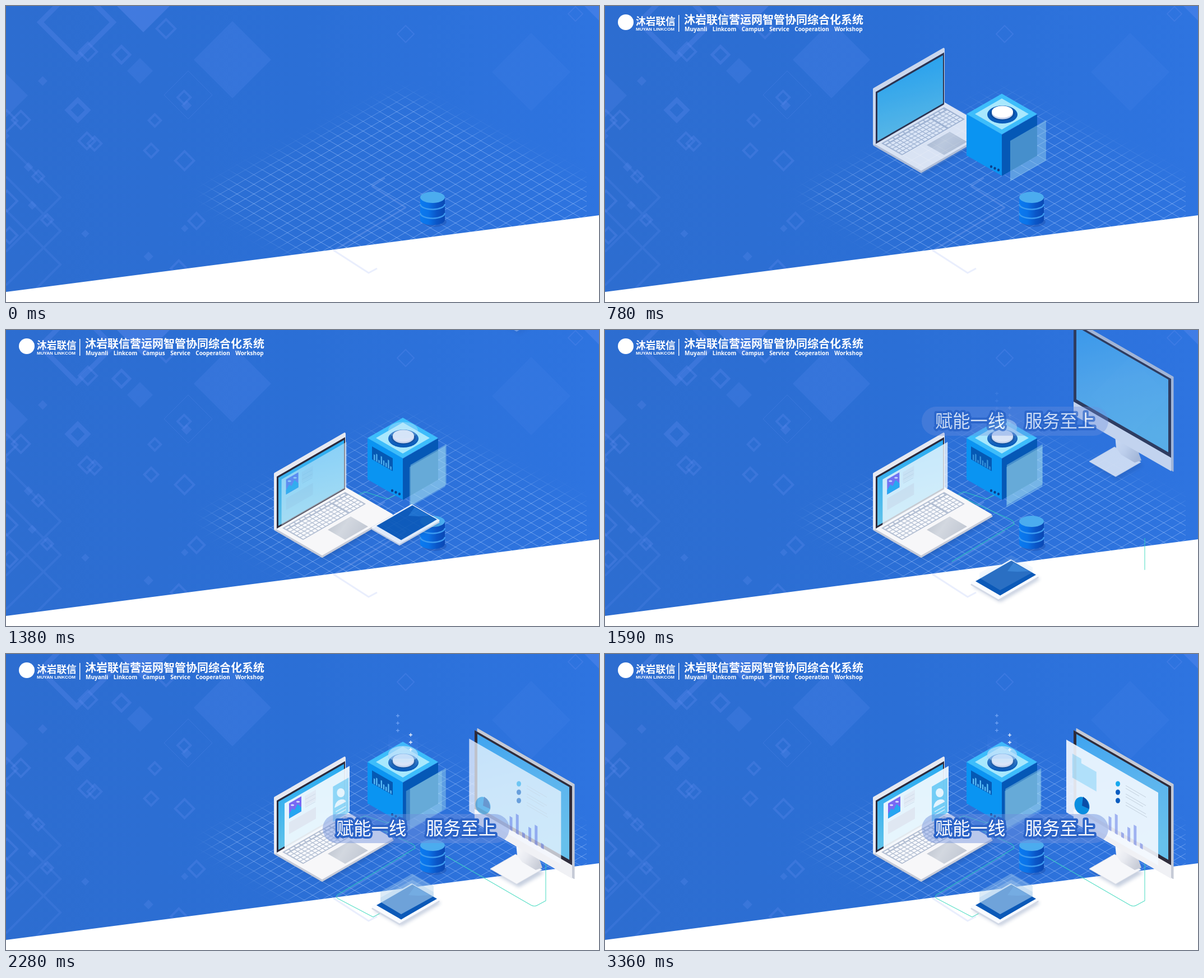
Write an HTML page that moves like this. It is 1058x529 px and loops after 3.39 s.

```html
<!DOCTYPE html>
<html lang="zh">
<head>
<meta charset="utf-8">
<title>Isometric banner</title>
<style>
html, body { margin: 0; width: 100%; height: 100%; overflow: hidden; background: #fff; }
svg { display: block; width: 100%; height: 100%; }
.cjk { font-family: "Noto Sans CJK SC", "Noto Sans CJK", sans-serif; }
.wide { font: 700 8.1px "Liberation Sans", sans-serif; }
.lat { font: 700 10px "Open Sans", sans-serif; word-spacing: 6.8px; }
</style>
</head>
<body>
<svg id="stage" viewBox="0 0 1058 529" xmlns="http://www.w3.org/2000/svg"></svg>
<script>
const LOOP = 3390, BEAT = 1050, K = 0.577; // K: slope of the isometric axes
const stage = document.getElementById('stage');
const range = (n, f) => Array.from({ length: n }, (_, i) => f(i)).join('');

let seed = 11;
const rnd = () => (seed = (seed * 16807) % 2147483647) / 2147483647;

// Markup helpers
const poly = (pts, fill, more = '') => `<polygon points="${pts}" fill="${fill}" ${more}/>`;
const line = (d, stroke, w, more = '') => `<path d="${d}" fill="none" stroke="${stroke}" stroke-width="${w}" ${more}/>`;
const oval = (x, y, rx, ry, fill, more = '') => `<ellipse cx="${x}" cy="${y}" rx="${rx}" ry="${ry}" fill="${fill}" ${more}/>`;
const group = (id, body, more = '') => `<g id="${id}" ${more}>${body}</g>`;
const diamond = (x, y, r) => `${x},${y - r} ${x + r},${y} ${x},${y + r} ${x - r},${y}`;
const round = (color, w) => `stroke="${color}" stroke-width="${w}" stroke-linejoin="round"`;
const fade = (id, x2, y2, ...stops) => `<linearGradient id="${id}" x1="0" y1="0" x2="${x2}" y2="${y2}">` +
  stops.map(([c, o = 1], i) => `<stop offset="${i / (stops.length - 1)}" stop-color="${c}" stop-opacity="${o}"/>`).join('') +
  '</linearGradient>';

// Upright face from its top left corner; dir 1 runs down to the right, -1 up
const wall = (x, y, w, h, dir) =>
  `${x},${y} ${x + w},${y + dir * w * K} ${x + w},${y + dir * w * K + h} ${x},${y + h}`;
// Flat face from its left corner: a to the upper right, b to the lower right
const floor = (x, y, a, b) =>
  `${x},${y} ${x + a},${y - a * K} ${x + a + b},${y + (b - a) * K} ${x + b},${y + b * K}`;
const shadow = pts => poly(pts, '#1d3f80', 'opacity=".25" filter="url(#blur)"');

const LAND = '0,0 1058,0 1058,374 0,511';
const defs = `<defs>
${fade('sky', 1, 0, ['#2d6dd0'], ['#2b6fd6'], ['#2e74e0'])}
${fade('lcd', 0.2, 1, ['#1fa6f4'], ['#3fb4ee'], ['#62c4ea'])}
${fade('desk', 0.2, 1, ['#3fa4f0'], ['#5cb4ee'], ['#66c0ec'])}
${fade('metal', 1, 0.4, ['#b9c0cc'], ['#d3d8e0'], ['#c3c9d4'])}
${fade('drum', 1, 0, ['#0a7af0'], ['#0a72e8'], ['#0a56c8'], ['#0a48b4'])}
${fade('neck', 1, 0.6, ['#fafbfd'], ['#e9ebf1'], ['#c9cdd8'])}
${fade('beamFill', 0, 1, ['#4a7ff0', 0], ['#6aa4ff', 0.5])}
${fade('domeFill', 0, 1, ['#c4e4fa', 0.5], ['#c4e4fa', 0.25], ['#c4e4fa', 0])}
<filter id="soft"><feGaussianBlur stdDeviation="16"/></filter>
<filter id="blur"><feGaussianBlur stdDeviation="3"/></filter>
<mask id="spot" maskUnits="userSpaceOnUse" x="0" y="0" width="1036" height="529">
${poly('710,158 350,338 560,470 760,560 1100,350', '#fff', 'filter="url(#soft)"')}</mask>
<clipPath id="land">${poly(LAND, '#000')}</clipPath>
</defs>`;

// Backdrop: large diamonds, a seeded scatter of small ones, a fading grid
const TINT = '#628cf0';
const solid = (x, y, r, o) => poly(diamond(x, y, r), TINT, `opacity="${o}"`);
const frame = (x, y, r, w) => poly(diamond(x, y, r), 'none', `stroke="${TINT}" stroke-opacity=".28" stroke-width="${w}"`);
const large = solid(404, 96, 69, 0.2) + solid(937, 118, 70, 0.09) + solid(245, -8, 55, 0.4) + solid(0, 160, 39, 0.2) +
  solid(1070, -12, 50, 0.35) + solid(239, 116, 23, 0.2) + frame(126, 29, 65, 9) + frame(325, 159, 43, 1) +
  frame(206, 87, 15, 5) + frame(128, 186, 18, 8) + frame(713, 50, 15, 2) + frame(1016, 14, 13, 2);
const small = range(24, i => {
  const x = 340 * rnd() ** 1.3, y = 40 + 430 * rnd();
  return i % 3 ? frame(x, y, 10 + 10 * rnd(), 4) : solid(x, y, 5 + 5 * rnd(), 0.25);
});
const weave = line(range(3, i => `M0 ${245 + i * 60}l97 97l-97 97`), TINT, 4, 'opacity=".2"');
const mesh = range(90, i => {
  const y = 163 + (i - 45) * 17.3;
  return `M0 ${y - 712 * K}l1058 ${1058 * K}M0 ${y + 712 * K}l1058 ${-1058 * K}`;
});
const backdrop = `<rect width="1058" height="529" fill="#fff"/>${poly(LAND, 'url(#sky)')}
<g clip-path="url(#land)">${large}${small}${weave}<g mask="url(#spot)">${line(mesh, '#a9cbff', 1, 'opacity=".5"')}</g></g>
${line('M676 307L653 322L713 360L585 437L647 477L662 469', '#a9bdf6', 3, 'opacity=".25" stroke-linejoin="round"')}`;

const drum = oval(764, 386, 22, 9, '#1c4ca8', 'opacity=".4"') +
  `<path d="M739 342v40a22 9.5 0 0 0 44 0v-40z" fill="url(#drum)"/>` +
  line('M739 354a22 9.5 0 0 0 44 0m-44 16a22 9.5 0 0 0 44 0', '#3d9af0', 2.5) + oval(761, 342, 22, 10, '#4bacef');

const wires = `<g fill="none" stroke="#30d8ba" stroke-width="1.1" stroke-linejoin="round">
<path id="wireA" pathLength="100" d="M706 290L680 302L640 289L628 295L724 339Q730 342 730 347L592 430Q587 434 592 437L655 470L670 462"/>
<path id="wireB" pathLength="100" d="M963 372V441L948 449Q943 452 937 449L785 361"/></g>`;

// Laptop
const keys = range(80, i => {
  const c = i % 16, r = (i - c) / 16;
  return `M${2 + c * 6.7 + (c > 11 ? 2 : 0)} ${7.5 + r * 5.8}h5.4v4.5h-5.4z`;
}) + range(12, c => `M${2 + c * 9} 2h7v3h-7z`);
const photo = poly(wall(505, 267, 22, 27, -1), '#7f62f4') +
  poly('505,294 505,286 511,276 515,279 520,268 527,274 527,281', '#22a4f2') +
  oval(511, 270, 3, 1.5, '#e8e4ff') + oval(521, 264, 3, 1.5, '#e8e4ff');
const lapSheet = group('lapSheet', poly(wall(497, 267, 116, 82, -1), '#f3faff') + photo +
  poly(wall(533, 254, 20, 19, -1), '#ece9f2', 'opacity=".7"') + poly(wall(505, 301, 48, 21, -1), '#ecebf3') +
  line(range(3, i => `M534 ${260 + i * 7}l18 -10`), '#dcdfea', 1));
const card = group('card', poly(wall(585, 237, 28, 63, -1), '#2ab4f2') +
  oval(599, 248, 7, 8, '#e4f5ff') + `<path d="M588 273q2-11 11-13q8-1 9 4l-20 11z" fill="#e4f5ff"/>` +
  line('M590 282l18 -10m-18 16l18 -10', '#bfe8fc', 1.5));
const laptop = group('laptop', shadow(floor(484, 360, 126, 85)) +
  poly(floor(480, 357, 126, 84), '#c6cbd8', round('#c6cbd8', 3)) + poly(floor(480, 354, 126, 84), '#f7f7f9', round('#f7f7f9', 1)) +
  poly(wall(480, 257, 124, 98, -1), '#e6e9f1', round('#e6e9f1', 4)) + poly(wall(483, 262, 122, 93, -1), '#2b2a3c') +
  poly(wall(486, 264, 117, 86, -1), 'url(#lcd)') +
  `<g transform="matrix(1 ${-K} 1 ${K} 493 354)"><rect width="112" height="37" fill="#b3bfd3"/><path d="${keys}" fill="#f8f9fc"/></g>` +
  poly(floor(574, 357, 41, 31), 'url(#metal)') + lapSheet + card);

// Cube
const chart = group('chart', poly(wall(653, 208, 37, 23, 1), '#0559b4') +
  group('chartBars', range(8, i => {
    const h = 10 + 5 * Math.sin(i * 2.4);
    return poly(wall(656 + i * 4.2, 232 + i * 2.4 - h, 2.4, h, 1), '#5cc0fa');
  })));
const pane = id => poly(wall(0, 37, 64, 72, -1), '#a8e2ee', `id="${id}"`);
const plus = x => range(3, i => `M${x - 3} ${i * 13.2}h6m-3 -3v6`);
const cube = group('cube', poly(wall(645, 193, 63, 74, 1), '#0a94f2') + poly(wall(708, 230, 63, 74, -1), '#0558b6') +
  poly(floor(645, 193, 63, 63), '#3dbdfb') + poly(floor(660, 193, 48, 48), '#a8e8fd') +
  oval(709, 194, 27, 16, '#0a5cba') + oval(709, 192, 22, 12.5, '#0a4c9e') +
  oval(709, 191.5, 19, 11, '#c6d2ec') + oval(709, 189, 19, 10.5, '#fff', 'id="knob"') +
  range(3, i => oval(689 + i * 6.5, 287 + i * 3, 2.2, 2.6, '#0b3f8c')) + chart) + pane('paneA') + pane('paneB') +
  '<rect id="beam" x="682" y="142" width="53" height="45" fill="url(#beamFill)"/>' +
  group('dome', '<path id="domeWall" fill="url(#domeFill)"/>' + oval(708.5, 0, 26.5, 15, '#c4e4fa', 'id="domeTop" opacity=".4"')) +
  line(plus(699), '#8fb8ff', 1.2, 'id="plusL"') + line(plus(722), '#fff', 1.4, 'id="plusR"');

// Tablet
const tablet = group('tablet', shadow(floor(656, 458, 71, 49)) +
  poly(floor(654, 455, 70, 48), '#d3d9e6', round('#d3d9e6', 3)) + poly(floor(654, 452, 70, 48), '#f9fbff', round('#f9fbff', 3)) +
  poly(floor(661, 449, 64, 44), '#0b59b8') + poly('718,431 729,416 756,431 736,432', '#2a84e0', 'opacity=".6"') +
  poly('', '#a9cdec', 'id="glowA"') + poly('', '#a9cdec', 'id="glowB"'));

// Desktop screen
const bars = range(6, i => {
  const h = 23 + 15 * Math.sin(2.1 * i + 0.1);
  return poly(wall(898.5 + i * 11.2, 314 + i * 6.5 - h, 5, h, 1), '#3c58e2');
});
const notes = range(3, i => oval(915, 232 + i * 15, 4, 4.8, i ? '#0a5cc0' : '#17a8ee') +
  line(`M929 ${235 + i * 15}l36 21m-36 -16l${24 + i * 7} ${14 + i * 4}`, '#c3d0dd', 1));
const pie = oval(851, 271, 13, 16, '#0b8ee0', 'transform="rotate(-20 851 271)"') +
  '<path d="M851 271L853 255Q863 261 864 277z" fill="#0a4ea8"/>';
const monitor = group('monitor', shadow(floor(868, 390, 45, 47)) +
  poly(floor(864, 384, 45, 47), '#f6f7fa', round('#dfe2ea', 1)) +
  poly('910,338 950,362 957,382 945,386 921,372 912,360', 'url(#neck)') +
  poly(wall(841, 133, 173, 169, 1), '#c5cad6', round('#c5cad6', 1)) + poly(wall(836, 136, 174, 165, 1), '#f0f1f5') +
  poly(wall(836, 136, 174, 141, 1), '#2f2c3b') + poly(wall(841, 143, 164, 130, 1), 'url(#desk)') +
  poly(wall(823, 153, 164, 130, 1), '#f4f9ff', 'id="deskGlass"') + group('deskInfo', notes + pie) + group('deskBars', bars) +
  group('folder', poly(wall(823, 178, 16, 30, 1), '#22b2f3') + poly(wall(823, 186, 43, 35, 1), '#22b2f3')));

const slogan = group('slogan', `<rect x="565" y="286" width="333" height="52" rx="26" fill="#6d8fdd" opacity=".46"/>
<g class="cjk" font-size="31.3" font-weight="500" fill="#fff" ${round('#2c64c8', 8)} paint-order="stroke">
<text x="589" y="323">赋能一线</text><text x="749" y="323">服务至上</text></g>`);

const header = group('header', `<circle cx="37" cy="29" r="14"/>
<g class="cjk" font-weight="700"><text x="55" y="34" font-size="17.7">沐岩联信</text>
<text x="141" y="32" font-size="20">沐岩联信营运网智管协同综合化系统</text></g>
<text class="wide" x="55" y="44">MUYAN LINKCOM</text><rect x="131" y="16" width="1.4" height="30"/>
<text class="lat" x="142" y="45">Muyanli Linkcom Campus Service Cooperation Workshop</text>`, 'fill="#fff"');

stage.innerHTML = defs + backdrop + drum + wires + laptop + cube + tablet + monitor + slogan + header;

// Motion
const parts = {};
stage.querySelectorAll('[id]').forEach(n => { parts[n.id] = n; });
const set = (id, attrs) => { for (const a in attrs) parts[id].setAttribute(a, attrs[a]); };
const shift = (id, x, y, opacity) => set(id, { transform: `translate(${x} ${y})`, opacity });
const clamp = v => Math.min(1, Math.max(0, v));
const ramp = (t, a, b) => { const p = clamp((t - a) / (b - a)); return p * p * (3 - 2 * p); };
const swing = (t, peak, period) => Math.cos((t - peak) / period * 2 * Math.PI);

function drop(id, t, start, dur, from) {
  const p = clamp((t - start) / dur);
  shift(id, 0, -from * (1 - p) ** 1.6, clamp(p * 1.27));
}

function glow(id, h, opacity) {
  set(id, { points: `668,${443 - h} 725,${411 - h} 763,${433 - h} 763,433 705,465 668,443`, opacity });
}

function wire(id, t, a, b) {
  set(id, { 'stroke-dasharray': `${100 * ramp(t, a, b)} 200`, opacity: t > a ? 0.8 : 0 });
}

function draw(t) {
  const beat = (1 + swing(t, 1830, BEAT)) / 2, rest = 1 - beat;

  drop('header', t, 60, 640, 50);
  drop('cube', t, 30, 470, 300);
  drop('laptop', t, 377, 600, 650);
  drop('tablet', t, 966, 600, 650);
  drop('monitor', t, 1230, 600, 650);
  drop('slogan', t, 1230, 600, 650);

  // Cube
  const cap = 180 - 12 * beat;
  set('chart', { opacity: ramp(t, 800, 1250) });
  set('chartBars', { opacity: ramp(t, 1000, 1500) * (0.2 + 0.8 * rest) });
  set('knob', { fill: t < 800 ? '#fff' : '#dde5f7' });
  shift('paneA', 720 + 6 * swing(t, 2650, 1600), 204, 0.4 * ramp(t, 560, 780));
  shift('paneB', 716 + 5 * swing(t, 2800, 1600), 208, 0.32 * ramp(t, 900, 1380));
  set('dome', { opacity: ramp(t, 1000, 1700) });
  set('domeTop', { cy: cap });
  set('domeWall', { d: `M682 193V${cap}a26.5 15 0 0 1 53 0V193a26.5 15 0 0 1 -53 0z` });
  const rise = ramp(t, 1500, 1800);
  set('beam', { opacity: 0.5 * rise });
  shift('plusL', 0, 110 + 6 * beat, 0.75 * rise);
  shift('plusR', 0, 145 - 10 * beat, 0.9 * rise);

  // Laptop
  const out = ramp(t, 950, 1800);
  shift('lapSheet', -11 * (1 - out), 0, 0.92 * out);
  shift('card', 7 * beat - 2, 0, ramp(t, 1850, 2500) * (0.6 + 0.4 * beat));

  // Tablet
  const lit = 0.4 * ramp(t, 1450, 1800);
  glow('glowA', 1 + 18 * rest, lit);
  glow('glowB', 8 * rest, lit * rest);

  // Desktop screen
  const open = ramp(t, 1700, 2500);
  shift('deskGlass', 18 * (1 - open), -9 * (1 - open), 0.9 * open);
  set('deskInfo', { opacity: ramp(t, 1850, 2700) });
  set('deskBars', { opacity: ramp(t, 1850, 2350) * (0.4 + 0.6 * beat) });
  shift('folder', 11 * rest, 0, ramp(t, 2300, 2700) * (0.25 + 0.75 * beat));

  wire('wireA', t, 1200, 1800);
  wire('wireB', t, 1500, 1810);
}

function tick(now) {
  draw(now % LOOP);
  requestAnimationFrame(tick);
}
draw(0);
requestAnimationFrame(tick);
</script>
</body>
</html>
```
